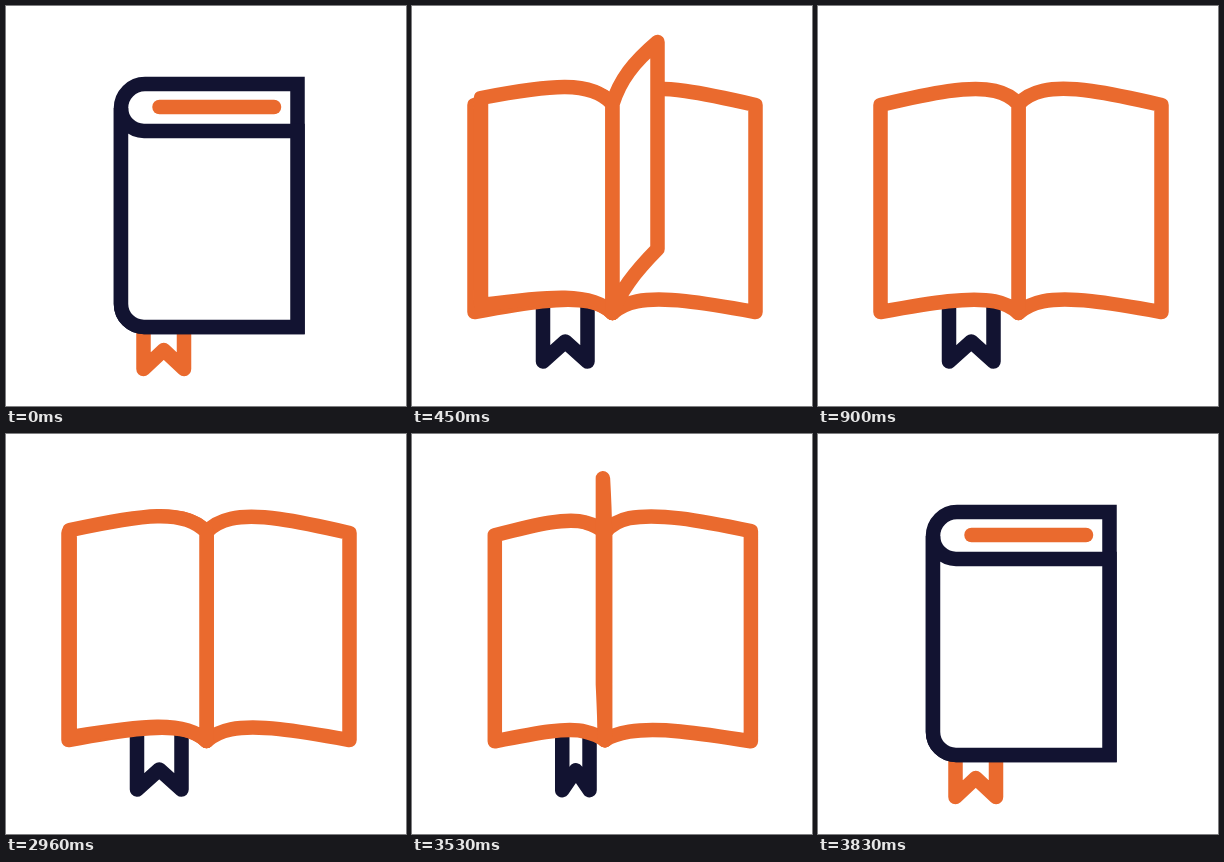
Recreate the animation shown at these times as an HTML page. Size 400x400 px, loop 4860 ms.

```html
<!DOCTYPE html>
<html>
<head>
<meta charset="utf-8">
<style>
html, body { margin: 0; width: 100%; height: 100%; overflow: hidden; background: #fff; }
svg { display: block; width: 100vw; height: 100vh; }
</style>
</head>
<body>
<svg id="stage" viewBox="0 0 400 400" fill="#fff" stroke-width="14.5" stroke-linecap="round" stroke-miterlimit="2"></svg>
<script>
const NAVY = '#121331', ORANGE = '#ea6a2e';
const LOOP = 4860, STEP = 30, MOVE = 900, CLOSE = 2930;
const LEAF_TIME = 400, LEAF_GAP = 200, FIRST_LEAF = 100;
const RIGHT = 143, LEFT = -138, COVER = 176.5;
const stage = document.getElementById('stage');

const lerp = (a, b, k) => a + (b - a) * k;
const mixPoint = (a, b, k) => [lerp(a[0], b[0], k), lerp(a[1], b[1], k)];
const mix = (a, b, k) => a.map((p, i) => mixPoint(p, b[i], k));
const shift = (pts, x, y) => pts.map(p => [p[0] + x, p[1] + y]);
const ease = u => {
  u = Math.min(1, u);
  return u < .5 ? 2 * u * u : 1 - 2 * (1 - u) ** 2;
};

// Way of a leaf's outer corner around the spine: progress, x, y
const TURN = [
  [0, RIGHT, 1], [.175, 114, -30], [.375, 45, -62], [.5, -2, -54],
  [.675, -72, -41], [.875, -131.5, -6], [1, LEFT, 1]
];

// Smooth curve through the key points
function cornerAt(f) {
  const end = TURN.length - 1;
  const i = Math.max(0, TURN.findIndex(k => k[0] >= f) - 1);
  const a = TURN[i], b = TURN[i + 1], h = b[0] - a[0], u = (f - a[0]) / h;
  const slope = (j, c) => {
    const p = TURN[Math.max(0, j - 1)], q = TURN[Math.min(end, j + 1)];
    return (q[c] - p[c]) / (q[0] - p[0]) * h;
  };
  const w = u * u * (3 - 2 * u);
  return [1, 2].map(c => lerp(a[c], b[c], w) +
    u * (1 - u) * ((1 - u) * slope(i, c) - u * slope(i + 1, c)));
}

// Paper edge bending from the spine at 0,0 to its corner
const bend = (x, y, rise) => [
  [0, 0], [.16 * x, -rise], [.47 * x, y / 2 + 16 - rise - Math.abs(x) / 16], [x, y]
];
const edges = (x, y) => [bend(x, y, 24), bend(x, y - 2, 21)];

// Cuts one cubic into two, so that it can blend with a rounded corner plus a line
function split(pts, k) {
  const head = [], tail = [];
  while (pts.length) {
    head.push(pts[0]);
    tail.unshift(pts[pts.length - 1]);
    pts = pts.slice(1).map((p, i) => mixPoint(pts[i], p, k));
  }
  return [...head, ...tail.slice(1)];
}

// Quarter circle followed by a straight line; negative r turns upwards
function rounded(r) {
  const s = Math.abs(r), line = k => [lerp(s, COVER, k), r];
  return [[0, 0], [0, r * .55], [s * .45, r], line(0), line(1 / 3), line(2 / 3), line(1)];
}

const path = (d, color, join = 'round', fill = '#fff') =>
  `<path d="${d}" stroke="${color}" stroke-linejoin="${join}" fill="${fill}"/>`;

// Outline from a top and a bottom edge, both running away from the spine
function panel(top, bottom) {
  const [start, ...rest] = top, [end, ...back] = [...bottom].reverse();
  return `M${start}C${rest}L${end}C${back}Z`;
}

function leaf(f, x, y, foot) {
  const [top, bottom] = edges(...cornerAt(f));
  return path(panel(shift(top, x, y), shift(bottom, x, foot)), ORANGE);
}

function ribbon(x, p, q) {
  const near = x + lerp(22.5, -25, q), far = x + lerp(63, -69.5, q);
  const low = lerp(363, 355.5, p), peak = lerp(344, 335.5, p);
  return path(`M${near} 296V${low}L${(near + far) / 2} ${peak}L${far} ${low}V296`,
    q < .5 ? ORANGE : NAVY, 'round', 'none');
}

// s runs from 0 (closed) to 900 (open, all leaves turned)
function draw(s) {
  const p = ease(s / 380), q = ease(s / 440);
  const x = lerp(115, 200.5, p), y = lerp(102, 98, p), foot = lerp(298, 307, p);
  const closed = lerp(COVER, LEFT, p) > 0;

  const board = (corner, radius) => {
    const [top, bottom] = edges(corner, 1).map(e => split(e, .28));
    return path(panel(
      shift(mix(rounded(radius), top, p), x, y),
      shift(mix(rounded(23), bottom, p), x, foot)),
    closed ? NAVY : ORANGE, closed ? 'miter' : 'round');
  };
  const back = board(RIGHT, -24), front = board(LEFT, 23);

  const leaves = [0, 1, 2]
    .map(i => (s - FIRST_LEAF - i * LEAF_GAP) / LEAF_TIME)
    .filter(f => f > 0 && f < 1)
    .sort((a, b) => Math.abs(b - .5) - Math.abs(a - .5))
    .map(f => leaf(f, x, y, foot)).join('');
  const title = closed ? path(`M${x + 38.5} 101h${114.5 * (1 - p / .56)}`, ORANGE) : '';

  stage.innerHTML = ribbon(x, p, q) + back + title +
    (closed ? leaves + front : front + leaves);
}

// Both moves advance in equal steps; closing runs the opening backwards
function progress(t) {
  const steps = from => Math.floor((t - from) / STEP) * STEP;
  return t < CLOSE ? Math.min(MOVE, steps(0)) : Math.max(0, MOVE - steps(CLOSE));
}

const begin = performance.now();
let last = -1;
function tick() {
  const s = progress((performance.now() - begin) % LOOP);
  if (s !== last) draw(last = s);
  requestAnimationFrame(tick);
}
tick();
</script>
</body>
</html>
```
